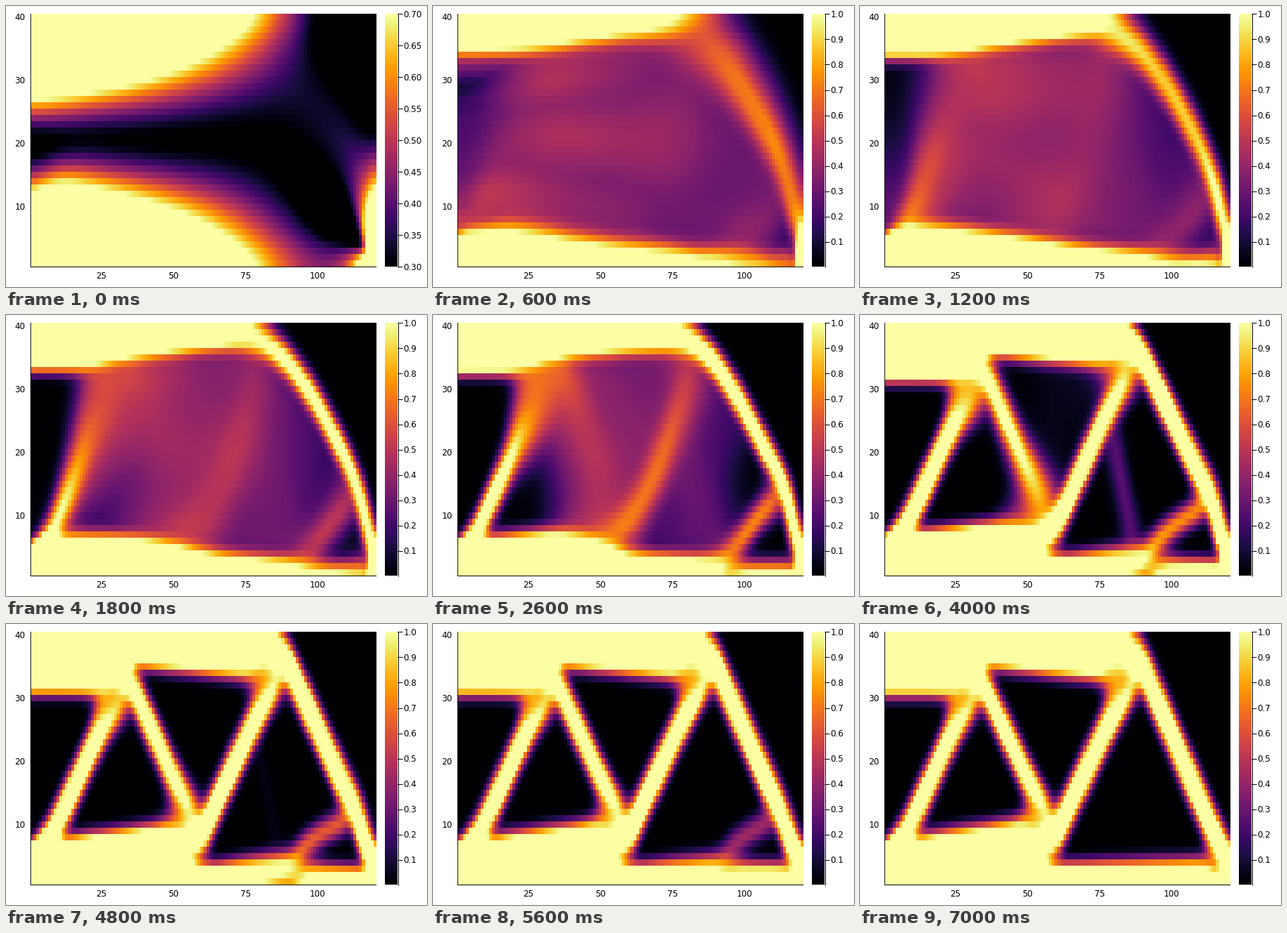
A matplotlib script for the animation above (7200 ms loop, 600x400 px).

```python
import itertools

import numpy as np
import matplotlib.pyplot as plt
from matplotlib.animation import FuncAnimation

# Half beam made of unit square elements; arrays are indexed [column, row], row 0 at the bottom
NX, NY = 120, 40
VOLUME, PENAL, RADIUS = 0.5, 3, 3.0
MOVE, X_MIN = 0.2, 0.001
POISSON = 0.3
STEPS, INTERVAL = 36, 200


def element_stiffness():
    """Bilinear plane stress square, nodes: left low, left high, right low, right high."""
    xi = np.array([-1, -1, 1, 1])
    eta = np.array([-1, 1, -1, 1])
    law = np.array([[1, POISSON, 0], [POISSON, 1, 0], [0, 0, (1 - POISSON) / 2]])
    law = law / (1 - POISSON ** 2)
    g = 1 / np.sqrt(3)
    stiff = np.zeros((8, 8))
    for s, t in itertools.product((-g, g), repeat=2):
        dx = xi * (1 + eta * t) / 2
        dy = eta * (1 + xi * s) / 2
        b = np.zeros((3, 8))
        b[0, 0::2] = b[2, 1::2] = dx
        b[1, 1::2] = b[2, 0::2] = dy
        stiff += b.T @ law @ b / 4
    return stiff


KE = element_stiffness()
ROWS = 2 * np.arange(NY)


def displacements(x):
    """Solve the block tridiagonal system, one block per column of nodes."""
    n = 2 * (NY + 1)
    e = x ** PENAL
    diag = np.zeros((NX + 1, n, n))
    side = np.zeros((NX, n, n))
    for a, b in itertools.product(range(4), repeat=2):
        r, c = ROWS + a, ROWS + b
        diag[:-1, r, c] += KE[a, b] * e
        diag[1:, r, c] += KE[4 + a, 4 + b] * e
        side[:, r, c] += KE[a, 4 + b] * e

    # symmetry on the left edge, vertical support in the lower right corner
    rollers = np.arange(0, n, 2)
    for block, fixed in ((diag[0], rollers), (diag[-1], np.array([1]))):
        block[fixed, :] = 0
        block[:, fixed] = 0
        block[fixed, fixed] = 1
    side[0][rollers, :] = 0
    side[-1][:, 1] = 0

    load = np.zeros(n)
    load[1] = -1
    gains = [None] * NX
    schur = diag[-1]
    for i in reversed(range(NX)):
        gains[i] = np.linalg.solve(schur, side[i].T)
        schur = diag[i] - side[i] @ gains[i]
    u = [np.linalg.solve(schur, load)]
    for gain in gains:
        u.append(-gain @ u[-1])
    return np.array(u)


def cone_sum(a):
    """Sum of neighbours weighted by RADIUS minus distance."""
    k = int(np.ceil(RADIUS)) - 1
    padded = np.pad(a, k)
    total = np.zeros_like(a)
    for i, j in itertools.product(range(-k, k + 1), repeat=2):
        w = max(0.0, RADIUS - np.hypot(i, j))
        total += w * padded[k + i:k + i + NX, k + j:k + j + NY]
    return total


CONE = cone_sum(np.ones((NX, NY)))


def improve(x):
    """One optimality criteria step."""
    u = displacements(x)
    index = ROWS[:, None] + np.arange(4)
    ue = np.concatenate([u[:-1][:, index], u[1:][:, index]], axis=2)
    energy = ((ue @ KE) * ue).sum(axis=2)
    gain = PENAL * x ** (PENAL - 1) * energy
    gain = np.maximum(cone_sum(x * gain) / (CONE * x), 0)

    low, high = np.maximum(X_MIN, x - MOVE), np.minimum(1, x + MOVE)
    l1, l2 = 0.0, 1e5
    while l2 - l1 > 1e-5:
        mid = (l1 + l2) / 2
        new = np.clip(x * np.sqrt(gain / mid), low, high)
        if new.mean() > VOLUME:
            l1 = mid
        else:
            l2 = mid
    return new


designs = [improve(np.full((NX, NY), VOLUME))]
while len(designs) < STEPS:
    designs.append(improve(designs[-1]))

# Layout in pixels, y downwards
LEFT, RIGHT, TOP, BOTTOM = 35, 528, 11, 371
BAR_LEFT, BAR_RIGHT = 540, 558
FONT = dict(family="DejaVu Sans", size=12 * 72 / 100, va="baseline")
LINE = dict(color="black", lw=0.72, solid_capstyle="butt")

fig = plt.figure(figsize=(6, 4), dpi=100, facecolor="white")
ax = fig.add_axes([0, 0, 1, 1])
ax.axis("off")

heat = ax.imshow(designs[0].T, cmap="inferno", origin="lower", aspect="auto",
                 interpolation="nearest", extent=(LEFT, RIGHT, BOTTOM, TOP))
ax.imshow(np.linspace(0, 1, 256)[:, None], cmap="inferno", origin="lower",
          aspect="auto", interpolation="nearest",
          extent=(BAR_LEFT, BAR_RIGHT, BOTTOM, TOP))
ax.set_xlim(0, 600)
ax.set_ylim(400, 0)

ax.plot([LEFT + 0.2] * 2, [TOP, BOTTOM + 0.5], snap=False, **LINE)
ax.plot([LEFT, RIGHT], [BOTTOM + 0.4] * 2, snap=False, **LINE)
ax.plot([BAR_RIGHT + 0.5] * 2, [TOP, BOTTOM + 0.5], **LINE)
for v in (25, 50, 75, 100):
    ax.text(LEFT + (v - 0.5) * (RIGHT - LEFT) / NX, 388, str(v), ha="center", **FONT)
for v in (10, 20, 30, 40):
    y = BOTTOM - (v - 0.5) * (BOTTOM - TOP) / NY
    ax.text(27.5, y + 5, str(v), ha="right", **FONT)

marks = [ax.plot([], [], **LINE)[0] for _ in range(10)]
labels = [ax.text(566.5, 0, "", ha="left", **FONT) for _ in range(10)]


def draw(i):
    x = designs[i]
    lo, hi = x.min(), x.max()
    heat.set_data(x.T)
    heat.set_clim(lo, hi)
    step, digits = (0.05, 2) if hi - lo < 0.5 else (0.1, 1)
    first = int(np.ceil(lo / step - 1e-6))
    for k, (mark, label) in enumerate(zip(marks, labels)):
        v = (first + k) * step
        shown = v < hi + 1e-6
        y = BOTTOM + 0.4 - (v - lo) / (hi - lo) * (BOTTOM - TOP)
        mark.set_data([BAR_RIGHT, BAR_RIGHT + 6.5], [y, y])
        label.set_y(y + 4.3)
        label.set_text(f"{v:.{digits}f}")
        mark.set_visible(shown)
        label.set_visible(shown)
    return [heat, *marks, *labels]


anim = FuncAnimation(fig, draw, frames=STEPS, interval=INTERVAL, repeat=True,
                     repeat_delay=0, blit=False)
plt.show()
```
